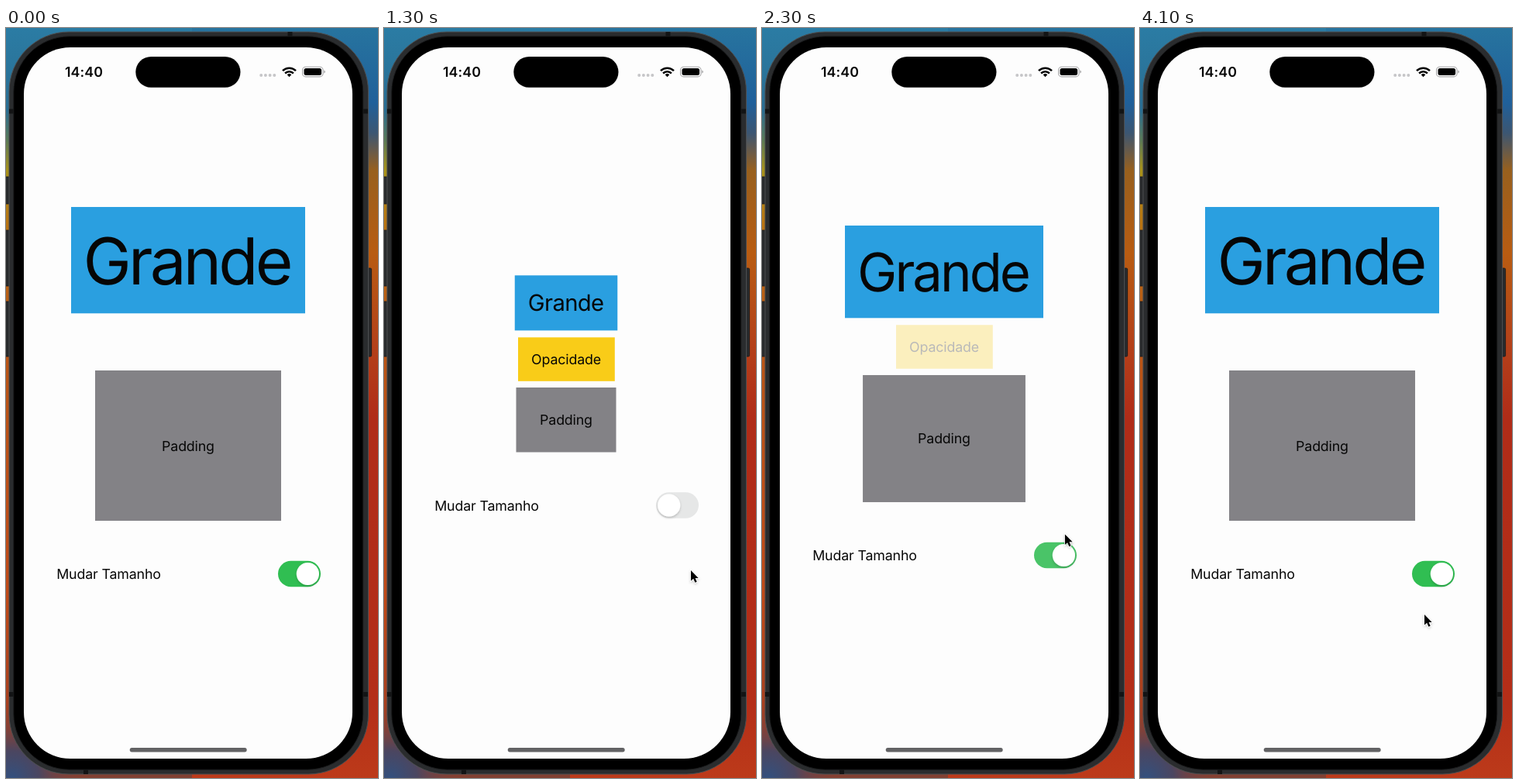
An HTML page for the animation above (4.2 s loop, 480 by 968 pixels).

```html
<!DOCTYPE html>
<html lang="pt">
<head>
<meta charset="utf-8">
<title>Mudar Tamanho</title>
<style>
  html, body { margin: 0; width: 100%; height: 100%; overflow: hidden; background: #fdfdfd; }
  svg { display: block; width: 480px; height: 968px; }
  text {
    font: 17.8px Inter, Roboto, sans-serif;
    font-optical-sizing: none;
    letter-spacing: -.15px;
    text-rendering: geometricPrecision;
    fill: #060606;
  }
  .mid { text-anchor: middle; }
</style>
</head>
<body>
<svg viewBox="0 0 480 968">
  <defs>
    <linearGradient id="left" x2="0" y2="1">
      <stop offset="0" stop-color="#2b7ca4"/>
      <stop offset=".11" stop-color="#2a6d92"/>
      <stop offset=".15" stop-color="#5b7a56"/>
      <stop offset=".19" stop-color="#a8921a"/>
      <stop offset=".26" stop-color="#b87412"/>
      <stop offset=".4" stop-color="#b85616"/>
      <stop offset=".75" stop-color="#c04a18"/>
      <stop offset=".9" stop-color="#a8401f"/>
      <stop offset="1" stop-color="#804032"/>
    </linearGradient>
    <linearGradient id="right" x2="0" y2="1">
      <stop offset="0" stop-color="#27749f"/>
      <stop offset=".1" stop-color="#20609a"/>
      <stop offset=".14" stop-color="#3c5672"/>
      <stop offset=".19" stop-color="#98601e"/>
      <stop offset=".3" stop-color="#b85c12"/>
      <stop offset=".42" stop-color="#b4421a"/>
      <stop offset=".52" stop-color="#b02c18"/>
      <stop offset=".9" stop-color="#b42e18"/>
      <stop offset="1" stop-color="#bc3a1a"/>
    </linearGradient>
    <radialGradient id="corner">
      <stop offset="0" stop-color="#33507e"/>
      <stop offset=".35" stop-color="#4b4660"/>
      <stop offset="1" stop-color="#a03c24" stop-opacity="0"/>
    </radialGradient>
    <filter id="soft" x="-40%" y="-40%" width="180%" height="180%">
      <feDropShadow dx="0" dy="1.5" stdDeviation="1.5" flood-opacity=".22"/>
    </filter>
  </defs>

  <!-- wallpaper -->
  <rect width="241" height="968" fill="url(#left)"/>
  <rect x="240" width="240" height="968" fill="url(#right)"/>
  <circle cx="8" cy="968" r="100" fill="url(#corner)"/>

  <!-- phone -->
  <g fill="#292b2d" stroke="#17191a" stroke-width=".8">
    <rect x="-3" y="192" width="8" height="35" rx="1.5"/>
    <rect x="-3" y="261" width="8" height="72" rx="1.5"/>
    <rect x="-3" y="353" width="8" height="71" rx="1.5"/>
    <rect x="465" y="310" width="6.6" height="114" rx="1.5"/>
  </g>
  <rect x="4" y="5" width="463.5" height="958" rx="77" fill="#2a2c2e" stroke="#4d4f51"/>
  <path d="M4 107.5h7M460 107.5h7M4 860h7M460 860h7M366.5 5v7M103 957v6" stroke="#131415" stroke-width="6"/>
  <rect x="9.8" y="10.8" width="451" height="946.4" rx="72" stroke="#1b1c1d"/>
  <rect x="23" y="25" width="424" height="918" rx="60" fill="#fdfdfd"/>
  <rect x="167.3" y="37" width="135.2" height="39.7" rx="19.85"/>

  <!-- status bar -->
  <text class="mid" x="100.5" y="63.2" style="font-weight:600;letter-spacing:.1px">14:40</text>
  <g fill="#c6c6c8">
    <circle cx="329.2" cy="61.1" r="2"/><circle cx="334.9" cy="61.1" r="2"/>
    <circle cx="340.6" cy="61.1" r="2"/><circle cx="346.3" cy="61.1" r="2"/>
  </g>
  <g fill="none" stroke="#000" stroke-width="2.5">
    <path d="M357 55.2a12.2 12.2 0 0 1 17 0M360.1 58.5a7.8 7.8 0 0 1 10.8 0"/>
    <path d="M365.5 63.2l-2.8-2.9a4 4 0 0 1 5.6 0z" fill="#000" stroke="none"/>
  </g>
  <rect x="382.6" y="50.3" width="26.4" height="12.6" rx="4" fill="none" stroke="#a5a5a7" stroke-width="1.1"/>
  <rect x="384.5" y="52.1" width="22.6" height="9" rx="2.5"/>
  <path d="M410.3 54.6q1.6.5 1.6 2t-1.6 2z" fill="#a5a5a7"/>
  <rect x="159.7" y="929" width="151" height="5.4" rx="2.7" fill="#626264"/>

  <!-- content -->
  <rect id="bigBox" fill="#2a9fe0"/>
  <text id="bigText" class="mid">Grande</text>
  <g id="fade">
    <rect x="173" width="124.8" height="56.5" fill="#f9cc18"/>
    <text class="mid" x="235" y="34.8">Opacidade</text>
  </g>
  <rect id="padBox" fill="#838286"/>
  <text id="padText" class="mid" x="235">Padding</text>
  <g id="row">
    <text x="65.2" y="6.5">Mudar Tamanho</text>
    <rect id="track" x="351" y="-16.7" width="55" height="33.4" rx="16.7"/>
    <rect id="knob" y="-14.6" height="29.2" rx="14.6" fill="#fff" filter="url(#soft)"/>
  </g>
  <path id="cursor" d="M0 0V13.6L3.2 10.8 5.4 15.8 7.7 14.8 5.6 9.9H9.7Z"
        stroke="#fff" stroke-width="1.5" paint-order="stroke" filter="url(#soft)"/>
</svg>
<script>
const LOOP = 4200, CX = 235;
const $ = id => document.getElementById(id);
const set = (id, attrs) => {
  for (const k in attrs) $(id).setAttribute(k, attrs[k]);
};
const mix = (a, b, p) => a + (b - a) * p;
const ease = x => {
  x = Math.min(1, Math.max(0, x));
  return x * x * (3 - 2 * x);
};

// 1 -> 0 starting at `off`, back to 1 starting at `on`
const swing = (t, off, on, dur) => 1 - ease((t - off) / dur) + ease((t - on) / dur);

// time, x, y
const path = [
  [100, 486, 790], [500, 396, 700], [1450, 396, 700], [1950, 379, 610],
  [2140, 379, 610], [2300, 391, 653], [2560, 367, 757], [LOOP, 367, 757]
];

function pointer(t) {
  const i = path.findIndex(k => k[0] > t);
  if (i < 1) return path[0].slice(1);
  const a = path[i - 1], b = path[i], p = (t - a[0]) / (b[0] - a[0]);
  return [mix(a[1], b[1], p), mix(a[2], b[2], p)];
}

const box = (id, w, top, bottom) =>
  set(id, { x: CX - w / 2, y: top, width: w, height: bottom - top });

function draw(t) {
  const p = swing(t, 972, 2084, 330);
  const tint = swing(t, 930, 2050, 330);
  const slide = swing(t, 900, 1990, 250);

  const top = mix(319.3, 231, p), track = mix(-.6, -3.8, p);
  box("bigBox", mix(132.5, 302, p), top, mix(390.4, 368.3, p));
  set("bigText", { x: CX + track / 2, y: top + 17.3 + mix(28.7, 82.2, p) });
  $("bigText").style.fontSize = mix(29.2, 83.5, p) + "px";
  $("bigText").style.letterSpacing = track + "px";

  const padTop = mix(464, 442, p), padEnd = mix(547.5, 636, p);
  box("padBox", mix(129, 240, p), padTop, padEnd);
  set("padText", { y: (padTop + padEnd) / 2 + 6.5 });
  set("fade", { transform: `translate(0 ${padTop - 64.7})`, opacity: 1 - p });

  const stretch = 3 * Math.sin(Math.PI * slide);
  const rgb = [[230, 48], [231, 190], [231, 82]].map(c => Math.round(mix(...c, tint)));
  set("row", { transform: `translate(0 ${mix(616, 704.5, p)})` });
  set("track", { fill: `rgb(${rgb})` });
  set("knob", { x: mix(367.7, 389.4, slide) - 14.6 - stretch / 2, width: 29.2 + stretch });

  set("cursor", { transform: `translate(${pointer(t)})` });
}

function tick() {
  draw(performance.now() % LOOP);
  requestAnimationFrame(tick);
}
tick();
</script>
</body>
</html>
```
